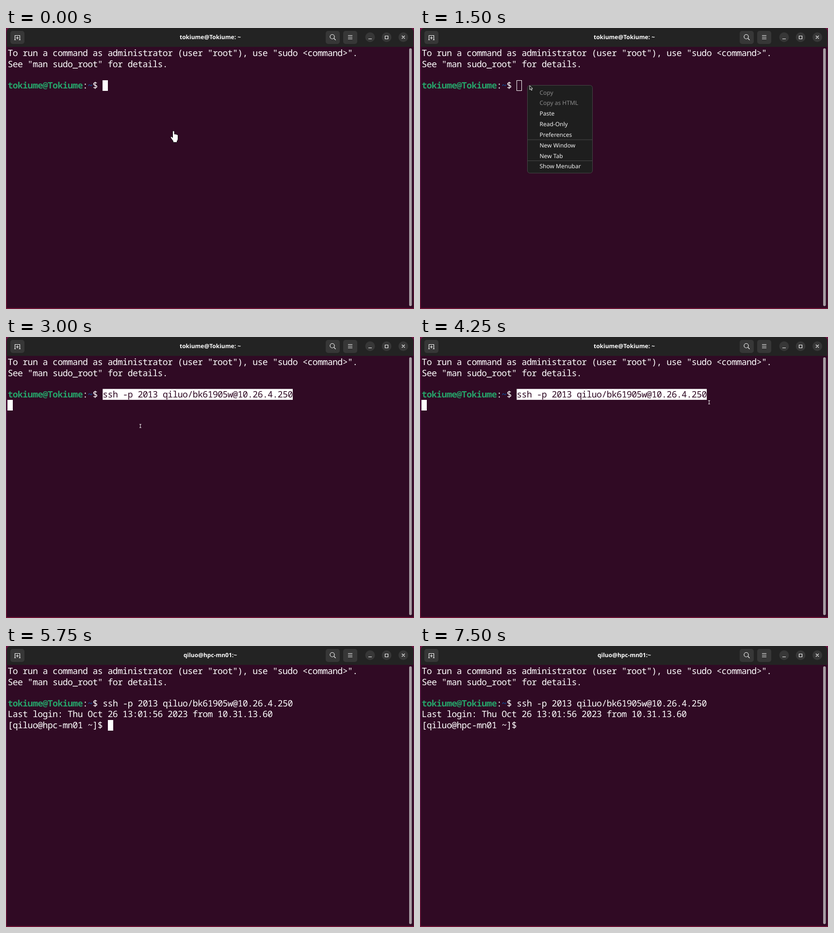
Recreate the animation shown at these times as an HTML page. Size 841 by 581 pixels, loop 7750 ms.

```html
<!DOCTYPE html>
<html lang="en">
<head>
<meta charset="utf-8">
<title>Terminal login</title>
<style>
  html, body { margin: 0; width: 100%; height: 100%; overflow: hidden; background: #300a24; }
  svg { display: block; width: 841px; height: 581px; }
  text { white-space: pre; text-rendering: geometricPrecision; }
  .term { font: 18.2px "Noto Sans Mono", "DejaVu Sans Mono", monospace; letter-spacing: -.61px; fill: #fff; }
  .term .user { fill: #26a269; font-weight: 700; }
  .term .path { fill: #12488b; font-weight: 700; }
  .title { font: 700 12px "Noto Sans", "Open Sans", sans-serif; fill: #fff; text-anchor: middle; }
  .menu text { font: 12px "Noto Sans", "Open Sans", sans-serif; fill: #f2f2f2; }
  .menu .off { fill: #8a8a8a; }
  .btn { fill: #373737; }
  .icon { fill: none; stroke: #f4f4f4; stroke-width: 1.2; }
</style>
</head>
<body>
<svg viewBox="0 0 841 581">
  <defs>
    <linearGradient id="desk" x2="0" y2="1">
      <stop offset="0" stop-color="#6b1440"/>
      <stop offset=".3" stop-color="#5c1a50"/>
      <stop offset="1" stop-color="#701638"/>
    </linearGradient>
  </defs>
  <rect width="841" height="581" fill="url(#desk)"/>
  <path d="M1.5 579V9q0-9 9-9H831q9 0 9 9V579z" fill="#300a24"/>
  <path d="M1.5 39V9q0-9 9-9H831q9 0 9 9V39z" fill="#232323"/>
  <rect x="831" y="42" width="5.5" height="533" rx="2.7" fill="#a79da4"/>

  <rect class="btn" x="9" y="6" width="29" height="27" rx="5"/>
  <rect class="btn" x="659" y="6" width="29" height="27" rx="5"/>
  <rect class="btn" x="695" y="6" width="29" height="27" rx="5"/>
  <circle class="btn" cx="750.5" cy="19" r="10"/>
  <circle class="btn" cx="784.5" cy="19" r="10"/>
  <circle class="btn" cx="819" cy="19" r="10"/>
  <path class="icon" d="M18.5 24.500V15.500H28.500V24.500M17 24.500H20.500M26.500 24.500H30M23.500 17.500V23.500M20.500 20.500H26.500"/>
  <path class="icon" d="M676 21.500L679.500 25M677 18a4.500 4.500 0 1 1-9 0a4.500 4.500 0 1 1 9 0"/>
  <path class="icon" d="M705 15.500H714M705 19H714M705 22.500H714"/>
  <path class="icon" d="M747 22.500H754M781.500 16.500H787.500V22.500H781.500zM816 16L822 22M822 16L816 22"/>
  <text class="title" id="title" x="421" y="23"></text>

  <rect id="selection" fill="#fff"/>
  <g id="lines"></g>
  <rect id="caret" stroke="#fff"/>

  <g class="menu" id="menu">
    <rect x="221.5" y="118.5" width="134" height="181.5" rx="5" fill="#1e1e1e" stroke="#454545"/>
    <rect id="hover" x="222" y="165" width="133" height="23" fill="#3c3c3c"/>
    <path d="M222 231H355M222 274.5H355" stroke="#484848"/>
  </g>

  <path id="hand" fill="#fff" stroke="#111" stroke-width="1"
    d="M-3.5 -9.5q0-1.8 1.8-1.8t1.8 1.8v5q1-1 2.4 .3q1.4-.8 2.4 .5q2.6-.2 2.6 2v6q0 4-2 5.500v2.700h-8v-2.500l-4.500-6.300q-1.500-2.500 .3-3q1.500-.2 3.200 2z"/>
  <path id="beam" fill="none" stroke="#e8e8e8" stroke-width="1.1" d="M-2 -3.500H2M0 -3.500V3.500M-2 3.500H2"/>
  <path id="arrow" fill="#111" stroke="#fff" stroke-width=".9" d="M0 0V8.500L2 6.700L3.600 10L5.100 9.300L3.600 6.200H6.200z"/>
</svg>
<script>
const LOOP = 7750, CELL = 10.31, ROW = 22.3, LEFT = 3.4, TOP = 41, BASELINE = 17.2;
const $ = id => document.getElementById(id);

function set(el, attrs) {
  for (const key in attrs) el.setAttribute(key, attrs[key]);
}

function add(parent, name, attrs, text = "") {
  const el = document.createElementNS("http://www.w3.org/2000/svg", name);
  set(el, attrs);
  el.textContent = text;
  return parent.appendChild(el);
}

const show = (el, on) => el.style.display = on ? "" : "none";
const colX = col => LEFT + col * CELL;
const rowY = row => TOP + row * ROW;

function line(row, text, col = 0) {
  return add($("lines"), "text", { class: "term", x: colX(col), y: rowY(row) + BASELINE }, text);
}

const command = "ssh -p 2013 qiluo/bk61905w@10.26.4.250";
line(0, 'To run a command as administrator (user "root"), use "sudo <command>".');
line(1, 'See "man sudo_root" for details.');
const prompt = line(3, "");
for (const [kind, text] of [["user", "tokiume@Tokiume"], ["", ":"], ["path", "~"], ["", "$"]])
  add(prompt, "tspan", { class: kind }, text);
const typed = line(3, command, 19);
const login = line(4, "Last login: Thu Oct 26 13:01:56 2023 from 10.31.13.60");
const remote = line(5, "[qiluo@hpc-mn01 ~]$");
set($("selection"), { x: colX(19), y: rowY(3) - .5, width: command.length * CELL, height: 22.5 });

["Copy", "Copy as HTML", "Paste", "Read-Only", "Preferences", "New Window", "New Tab", "Show Menubar"]
  .forEach((label, i) =>
    add($("menu"), "text", { x: 246.5, y: 137.5 + i * 21.85, class: i < 2 ? "off" : "" }, label));

// time, shape, x, y
const pointer = [
  [0, "hand", 347, 224], [250, "beam", 346, 216], [750, "beam", 300, 193],
  [1000, "beam", 247, 139], [1250, "beam", 227, 124.5], [1500, "arrow", 226, 119],
  [2000, "arrow", 238, 126], [2250, "arrow", 271, 166], [2500, "arrow", 276, 178],
  [3000, "beam", 277, 184], [3750, "beam", 596, 135], [4500, ""],
  [6750, "beam", 608.5, 286], [7000, "beam", 552, 548], [7250, ""]
];

// time, shape, column, row
const caret = [
  [0, "block", 19, 3], [500, ""], [1000, "block", 19, 3], [1500, "hollow", 19, 3],
  [3000, "block", 0, 4], [3500, ""], [4250, "block", 0, 4],
  [4750, "block", 0, 5], [5000, ""], [5750, "block", 20, 5], [6250, ""],
  [6750, "block", 20, 5], [7500, ""]
];

const at = (track, t) => track.findLast(step => step[0] <= t);

function draw(t) {
  const [, shape, x, y] = at(pointer, t);
  for (const id of ["hand", "beam", "arrow"]) show($(id), id === shape);
  if (shape) set($(shape), { transform: `translate(${x} ${y})` });

  const [, kind, col, row] = at(caret, t);
  show($("caret"), kind);
  if (kind) {
    set($("caret"), {
      x: Math.round(colX(col)) + .5, y: Math.round(rowY(row)) + .5, width: 10, height: 21,
      fill: kind === "block" ? "#fff" : "none"
    });
  }

  const selected = t >= 3000 && t < 4500;
  show($("menu"), t >= 1500 && t < 3000);
  show($("hover"), t >= 2500);
  show($("selection"), selected);
  show(typed, t >= 3000);
  typed.style.fill = selected ? "#300a24" : "#fff";
  show(login, t >= 4750);
  show(remote, t >= 5750);
  $("title").textContent = t < 5750 ? "tokiume@Tokiume: ~" : "qiluo@hpc-mn01:~";
}

const start = performance.now();
function tick() {
  draw((performance.now() - start) % LOOP);
  requestAnimationFrame(tick);
}
tick();
</script>
</body>
</html>
```
